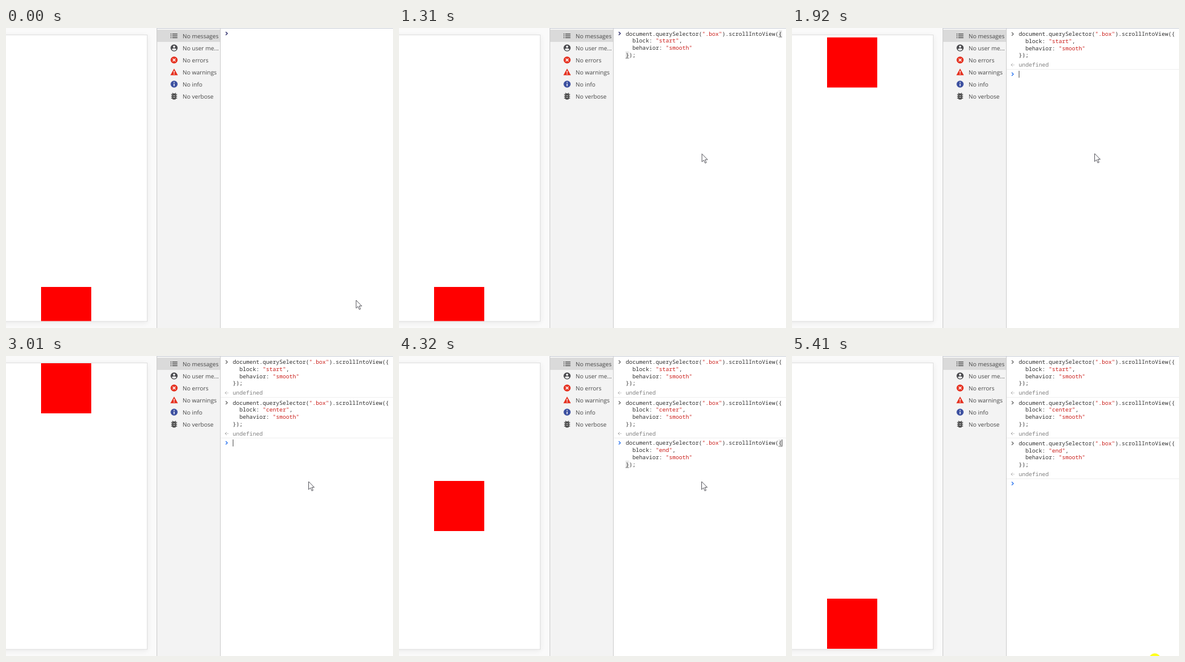
Recreate the animation shown at these times as an HTML page. Size 640 by 497 pixels, loop 5.49 s.

```html
<!DOCTYPE html>
<html lang="en">
<head>
<meta charset="utf-8">
<title>scrollIntoView</title>
<style>
  html, body { margin: 0; width: 100%; height: 100%; overflow: hidden; background: #fff; }
  svg { display: block; width: 100%; height: 100%; }
  text { text-rendering: geometricPrecision; }
  .side { font: 9.6px "Open Sans", "Noto Sans", sans-serif; fill: #484848; }
  .code { font: 9.16px "Noto Sans Mono", "DejaVu Sans Mono", monospace; fill: #303030; }
  .str { fill: #cb1f1b; }
  .result { fill: #808080; }
  .chevron { fill: none; stroke: #747474; stroke-width: 1.4; }
</style>
</head>
<body>
<svg viewBox="0 0 640 497">
  <defs>
    <clipPath id="view"><rect y="12" width="233" height="473.5"/></clipPath>
    <clipPath id="page"><rect width="249" height="497"/></clipPath>
    <filter id="soft" x="-10%" y="-10%" width="120%" height="120%"><feGaussianBlur stdDeviation="5"/></filter>
  </defs>

  <g clip-path="url(#page)">
    <rect width="249" height="497" fill="#fafafa"/>
    <rect x="-20" y="13" width="254" height="475" fill="#000" opacity=".07" filter="url(#soft)"/>
    <rect x="-5" y="11.5" width="238.5" height="474.5" fill="#fff" stroke="#dfdfdf"/>
  </g>
  <g clip-path="url(#view)"><rect id="box" x="58" width="83" height="83" fill="#f00"/></g>

  <rect x="249" width="106" height="497" fill="#f3f3f3"/>
  <rect x="249" y="3" width="106" height="20" fill="#dadada"/>
  <path d="M249.5 0V497M354.5 0V497" stroke="#cdcdcd"/>
  <path d="M249 .5H640" stroke="#cbcfd8"/>

  <g id="labels" class="side"></g>
  <path d="M272 10h1.6M275 10h8.5M272 13h1.6M275 13h8.5M272 16h1.6M275 16h8.5" stroke="#555" stroke-width="1.3"/>
  <circle cx="278" cy="33" r="5.8" fill="#48484c"/>
  <circle cx="278" cy="31" r="1.8" fill="#fff"/>
  <path d="M274.4 35.6q0-1.9 3.6-1.9t3.6 1.9q-1.4 1.9-3.6 1.9t-3.6-1.9z" fill="#fff"/>
  <circle cx="278" cy="53" r="5.8" fill="#e5301f"/>
  <path d="M275.7 50.7l4.6 4.6m0-4.6l-4.6 4.6" stroke="#fff" stroke-width="1.4"/>
  <path d="M278 67.2l6.2 11h-12.4z" fill="#e5301f"/>
  <path d="M278 71v3.5M278 75.6v1.4" stroke="#fff" stroke-width="1.4"/>
  <circle cx="278" cy="93" r="5.8" fill="#3c50a0"/>
  <path d="M278 89.6v1.5M278 92.3v4" stroke="#fff" stroke-width="1.5"/>
  <path d="M273 110.2h10M273 113.2h10M273 116.2h10M275.2 107.6l1.6 1.8M280.8 107.6l-1.6 1.8" stroke="#484848" stroke-width="1.2"/>
  <rect x="274.7" y="108.6" width="6.6" height="10" rx="3.2" fill="#484848"/>
  <path d="M276.7 112h2.6M276.7 115h2.6" stroke="#f3f3f3" stroke-width="1.1"/>

  <g id="log"></g>
  <g id="prompt">
    <path id="arrow" class="chevron" d="M363.4 6.4l2.7 2.7-2.7 2.7"/>
    <g id="input"></g>
    <path id="caret" stroke="#555"/>
  </g>

  <path id="mouse" d="M0 0V13.2L3 10.4L5.3 15.4L7.3 14.5L5.1 9.6H9.3Z" fill="#fff" stroke="#484850" stroke-width=".9"/>
  <circle id="click" cx="600" cy="502" r="9.4" fill="#ffff1e"/>
</svg>

<script>
const LOOP = 5490, TICK = 77.1, ROW = 67.4, LINE = 11.7;
const $ = id => document.getElementById(id);
const show = (el, on) => el.setAttribute('visibility', on ? 'visible' : 'hidden');

const commits = [[1610, 'start'], [3010, 'center'], [4720, 'end']];
const inputs = [
  [0, ''], [300, 'start'], [1610, ''], [2080, 'start'], [2460, 'center'], [3010, ''],
  [3390, 'center'], [3560, 'start'], [3790, 'center'], [4320, 'end'], [4720, '']
];
// start time, duration, from, to
const scrolls = [[1601, 340, 429, 12], [3010, 233, 12, 207], [4720, 233, 207, 402]];
// start time, end time, from, to
const moves = [
  [0, 370, 579, 451, 509, 249],
  [615, 920, 509, 249, 503.5, 220],
  [1075, 1310, 503.5, 220, 501, 208.5],
  [1610, 1690, 501, 208.5, 500.5, 208],
  [4950, 5260, 500.5, 208, 596, 500]
];

const str = s => `<tspan class="str">"${s}"</tspan>`;

function snippet(block, y) {
  const lines = [
    `document.querySelector(${str('.box')}).scrollIntoView({`,
    `block: ${str(block)},`,
    `behavior: ${str('smooth')}`,
    '});'
  ];
  return lines.map((s, i) =>
    `<text class="code" x="${i % 3 ? 386 : 375}" y="${y + i * LINE}">${s}</text>`).join('');
}

function bracket(x, y) {
  return `<rect x="${x}" y="${y - 9.3}" width="6" height="12" fill="#e9e9e9"/>
    <path d="M${x} ${y + 2.3}h6" stroke="#8c8c8c"/>`;
}

function entry(block, i) {
  return `<g transform="translate(0 ${i * ROW})">
    <path class="chevron" d="M363.4 7.3l2.7 2.7-2.7 2.7"/>
    ${snippet(block, 13.2)}
    <path d="M365 58.6l-2.5 2.5 2.5 2.5M362.5 61.1h2M366 61.1h1.5" fill="none" stroke="#aaa"/>
    <text class="code result" x="375" y="64.4">undefined</text>
    <path d="M355 68.5H640" stroke="#efefef"/>
  </g>`;
}

// cubic-bezier(.42, 0, .58, 1)
function easeInOut(x) {
  if (x <= 0) return 0;
  if (x >= 1) return 1;
  let lo = 0, hi = 1;
  for (let i = 0; i < 24; i++) {
    const s = (lo + hi) / 2, r = 1 - s;
    if (1.26 * s * r * r + 1.74 * s * s * r + s ** 3 < x) lo = s; else hi = s;
  }
  return lo * lo * (3 - 2 * lo);
}

// the screen was refreshed in coarse ticks
const snap = (t, from) => from + Math.floor((t - from + 1) / TICK) * TICK;

function boxTop(t) {
  let y = scrolls[0][2];
  scrolls.forEach(([start, dur, from, to], i) => {
    const s = snap(t, commits[i][0]);
    if (t >= commits[i][0]) y = from + (to - from) * easeInOut((s - start) / dur);
  });
  return y;
}

function mouseAt(t) {
  let [, , x, y] = moves[0];
  for (const [a, b, x0, y0, x1, y1] of moves) {
    if (t < a) break;
    const ticks = Math.round((b - a) / TICK), tick = (b - a) / ticks;
    const k = Math.min(1, Math.floor((t - a + 2) / tick) / ticks);
    x = x0 + (x1 - x0) * k;
    y = y0 + (y1 - y0) * k;
  }
  return [x, y];
}

function caretOn(t) {
  return t >= 300 && t < 850 || t >= 1610 && t < 5240;
}

$('labels').innerHTML =
  ['messages', 'user me...', 'errors', 'warnings', 'info', 'verbose']
    .map((s, i) => `<text x="292" y="${16.6 + i * 20}">No ${s}</text>`).join('');
$('log').innerHTML = commits.map(([, block], i) => entry(block, i)).join('');
const entries = [...$('log').children];
let shown = null;

function render(t) {
  $('box').setAttribute('y', boxTop(t));

  const count = commits.filter(([at]) => t >= at).length;
  entries.forEach((el, i) => show(el, i < count));
  $('prompt').setAttribute('transform', `translate(0 ${count * ROW})`);
  $('arrow').style.stroke = count ? '#367cf1' : '#33336e';

  const text = inputs.filter(([at]) => t >= at).pop()[1];
  if (text !== shown) {
    shown = text;
    $('input').innerHTML = text &&
      bracket(627.5, 12.7) + bracket(374.5, 12.7 + 3 * LINE) + snippet(text, 12.7);
    $('caret').setAttribute('d', text ? 'M633.5 3.5v11.5' : 'M375.5 3.5v11.5');
  }
  show($('caret'), caretOn(t));

  $('mouse').setAttribute('transform', `translate(${mouseAt(t)})`);
  show($('mouse'), t < 5258);
  show($('click'), t >= 5410);
}

const begin = performance.now();
function loop() {
  render((performance.now() - begin) % LOOP);
  requestAnimationFrame(loop);
}
loop();
</script>
</body>
</html>
```
